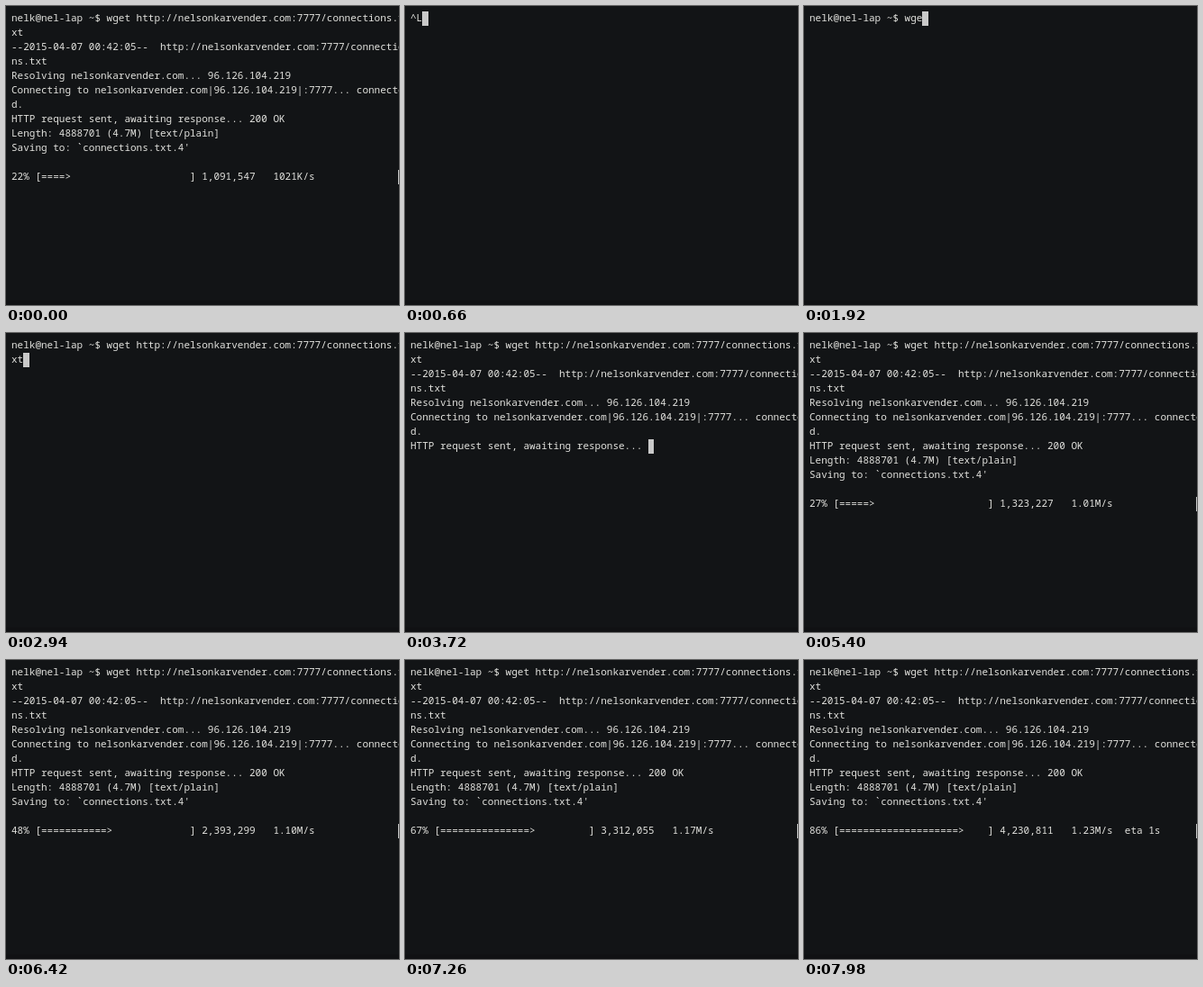
These frames come from a looping animation (436x332 px, 8 s). An HTML page:

```html
<!DOCTYPE html>
<html lang="en">
<head>
<meta charset="utf-8">
<title>Terminal download</title>
<style>
  html, body { margin: 0; width: 100%; height: 100%; overflow: hidden; background: #121416; }
  body { position: relative; }
  pre, #cursor, #edge { position: absolute; margin: 0; }
  pre { left: 6px; top: 5px; color: #e2e2de; font: 500 11px/16px "Noto Sans Mono", "DejaVu Sans Mono", monospace; }
  #cursor { width: 6.4px; height: 16px; background: #c9c9c9; }
  #edge { left: 0; right: 0; top: 327px; height: 5px; background: #101113; }
</style>
</head>
<body>
<div id="edge"></div>
<pre id="screen"></pre>
<div id="cursor"></div>
<script>
const LOOP = 8000, COLS = 66, CELL = 6.6, ROW = 16, PAD = 6;
const TOTAL = 4888701, BAR = 25;
const host = 'nelsonkarvender.com', ip = '96.126.104.219';
const url = `http://${host}:7777/connections.txt`;
const prompt = 'nelk@nel-lap ~$ ';
const command = prompt + 'wget ' + url;

const stamp = `${command}\n--2015-04-07 00:42:05--  ${url}\n`;
const resolving = `${stamp}Resolving ${host}... `;
const connecting = `${resolving}${ip}\nConnecting to ${host}|${ip}|:7777... `;
const request = `${connecting}connected.\nHTTP request sent, awaiting response... `;
const reply = `${request}200 OK\nLength: ${TOTAL} (4.7M) [text/plain]\nSaving to: \`connections.txt.4'\n\n`;

// Moments when the meter redraws
const ticks = [3840, 4140, 4380, 4620, 4860, 5100, 5400, 5640, 5880,
               6120, 6420, 6720, 7020, 7260, 7500, 7740, 7980];
// [redraw, bytes received, KiB per second]
const progress = [[0, 0, 860], [6, 1323227, 1034], [10, 2393299, 1126], [16, 4230811, 1260]];

function meter(bytes, speed, eta = '') {
  const percent = String(Math.floor(100 * bytes / TOTAL)).padStart(2);
  const size = Math.floor(BAR * bytes / TOTAL);
  const bar = (size ? '='.repeat(size - 1) + '>' : '').padEnd(BAR);
  const rate = !bytes ? '--.-K/s'
    : speed < 1024 ? `${Math.round(speed)}K/s`.padStart(7)
    : `${(speed / 1024).toFixed(2)}M/s`;
  const count = bytes.toLocaleString('en-US').padEnd(11);
  return reply + `${percent}% [${bar}] ${count} ${rate}${eta}`.padEnd(COLS - 1);
}

function download(n) {
  const i = Math.max(1, progress.findIndex(p => p[0] >= n));
  const [a, b] = [progress[i - 1], progress[i]];
  const k = (n - a[0]) / (b[0] - a[0]);
  const mix = j => a[j] + (b[j] - a[j]) * k;
  return meter(Math.round(mix(1)), mix(2), n >= 15 ? '  eta 1s' : '');
}

const typed = n => command.slice(0, prompt.length + n);
const scenes = [
  [0, meter(1091547, 1021)],
  [660, '^L'],
  [900, prompt],
  [1200, typed(1)],
  [1560, typed(2)],
  [1920, typed(3)],
  [2040, typed(4)],
  [2580, typed(5)],
  [2880, command.slice(0, COLS - 1)],
  [2940, command],
  [3540, command + '\n'],
  [3600, resolving],
  [3660, connecting],
  [3720, request],
  [3780, reply],
  ...ticks.map((time, n) => [time, download(n)])
];

const wrap = text => text.split('\n').flatMap(line => line.match(/.{1,66}/g) || ['']);
const screen = document.getElementById('screen');
const cursor = document.getElementById('cursor');
let shown;

function draw(now) {
  const t = now % LOOP;
  const text = scenes.findLast(scene => scene[0] <= t)[1];
  if (text !== shown) {
    const lines = wrap(text);
    screen.textContent = lines.join('\n');
    cursor.style.left = PAD + CELL * lines.at(-1).length + 'px';
    cursor.style.top = PAD + ROW * (lines.length - 1) + 'px';
    shown = text;
  }
}

const start = performance.now();
function frame() {
  draw(performance.now() - start);
  requestAnimationFrame(frame);
}
frame();
</script>
</body>
</html>
```
